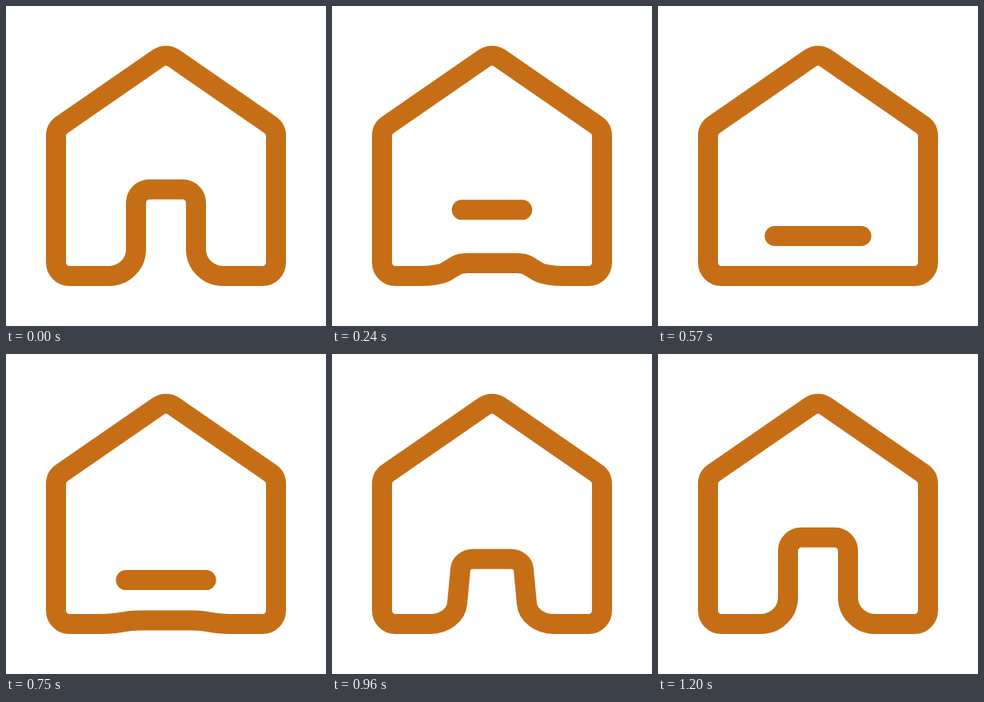
Write an HTML page with a canvas that moves like this. It is 400 px wide and 400 px high and loops after 3.23 s.

```html
<!DOCTYPE html>
<html lang="en">
<head>
<meta charset="utf-8">
<title>Home icon</title>
<style>
  html, body { margin: 0; width: 100%; height: 100%; overflow: hidden; background: #fff; }
  canvas { display: block; width: 400px; height: 400px; }
</style>
</head>
<body>
<canvas id="stage"></canvas>
<script>
const LOOP = 3230, STEP = 30, TURN = 660, END = 1200;
const LEFT = 62.5, FLOOR = 337.5, EAVE = 153.6, PEAK = 58.6, LINTEL = 229.2;
const RADIUS = 16.7, DOOR = 162.5;

const stage = document.getElementById('stage');
const ratio = window.devicePixelRatio || 1;
stage.width = stage.height = 400 * ratio;
const ctx = stage.getContext('2d');
ctx.scale(ratio, ratio);
ctx.strokeStyle = '#c66e16';
ctx.lineWidth = 25;
ctx.lineCap = ctx.lineJoin = 'round';

const mix = (a, b, k) => a + (b - a) * k;
const between = (p, q, k) => [mix(p[0], q[0], k), mix(p[1], q[1], k)];
const mirror = ([x, y]) => [400 - x, y];

// Cubic ease with control points (x1, 0) and (x2, 1)
function ease(x1, x2, t, start, end) {
  const x = Math.min(1, Math.max(0, (t - start) / (end - start)));
  let lo = 0, hi = 1;
  for (let i = 0; i < 30; i++) {
    const u = (lo + hi) / 2, v = 1 - u;
    if (3 * x1 * u * v * v + 3 * x2 * u * u * v + u * u * u < x) lo = u;
    else hi = u;
  }
  return lo * lo * (3 - 2 * lo);
}

// Left foot and top corner of the doorway, each as [start, vertex, end]
function doorCorners(shut) {
  const foot = [DOOR - 34 * shut, FLOOR];
  const top = [DOOR - 3 * shut, mix(LINTEL, FLOOR, shut)];
  return [
    [[foot[0] - 2 * RADIUS + 12 * shut, FLOOR], foot, between(foot, top, 0.307)],
    [between(top, foot, 0.154), top, [top[0] + RADIUS - 8 * shut, top[1]]]
  ];
}

function drawHouse(shut) {
  const left = doorCorners(shut);
  const right = left.map(c => c.map(mirror).reverse()).reverse();
  const start = left[0][0];
  ctx.beginPath();
  ctx.moveTo(...start);
  for (const [a, v, b] of [...left, ...right]) {
    ctx.lineTo(...a);
    ctx.bezierCurveTo(...between(a, v, 0.55), ...between(b, v, 0.55), ...b);
  }
  const base = [LEFT, FLOOR], eave = [LEFT, EAVE];
  const shell = [mirror(base), mirror(eave), [200, PEAK], eave, base, start];
  for (let i = 0; i < shell.length - 1; i++) {
    ctx.arcTo(...shell[i], ...shell[i + 1], RADIUS);
  }
  ctx.closePath();
  ctx.stroke();
}

function drawBar(y, half) {
  ctx.beginPath();
  ctx.moveTo(200 - half, y);
  ctx.lineTo(200 + half, y);
  ctx.stroke();
}

function draw(t) {
  const closing = t < TURN;
  const shut = closing ? ease(.33, .29, t, 0, 400) : 1 - ease(.54, .3, t, TURN, END);
  const grow = closing ? ease(.36, .22, t, 0, 540) : 1 - ease(.33, .67, t, TURN, END);
  const y = closing
    ? mix(231, 287.5, ease(.46, .12, t, 100, 540))
    : mix(287.5, 235, ease(.26, .72, t, TURN, END));

  ctx.clearRect(0, 0, 400, 400);
  drawHouse(shut);
  // The bar slips out of the lintel and back behind it
  if (t > 0 && t < 960) drawBar(y, 54.2 * grow);
}

const begin = performance.now();
function tick() {
  const t = (performance.now() - begin) % LOOP;
  draw(Math.floor(t / STEP) * STEP);
  requestAnimationFrame(tick);
}
tick();
</script>
</body>
</html>
```
